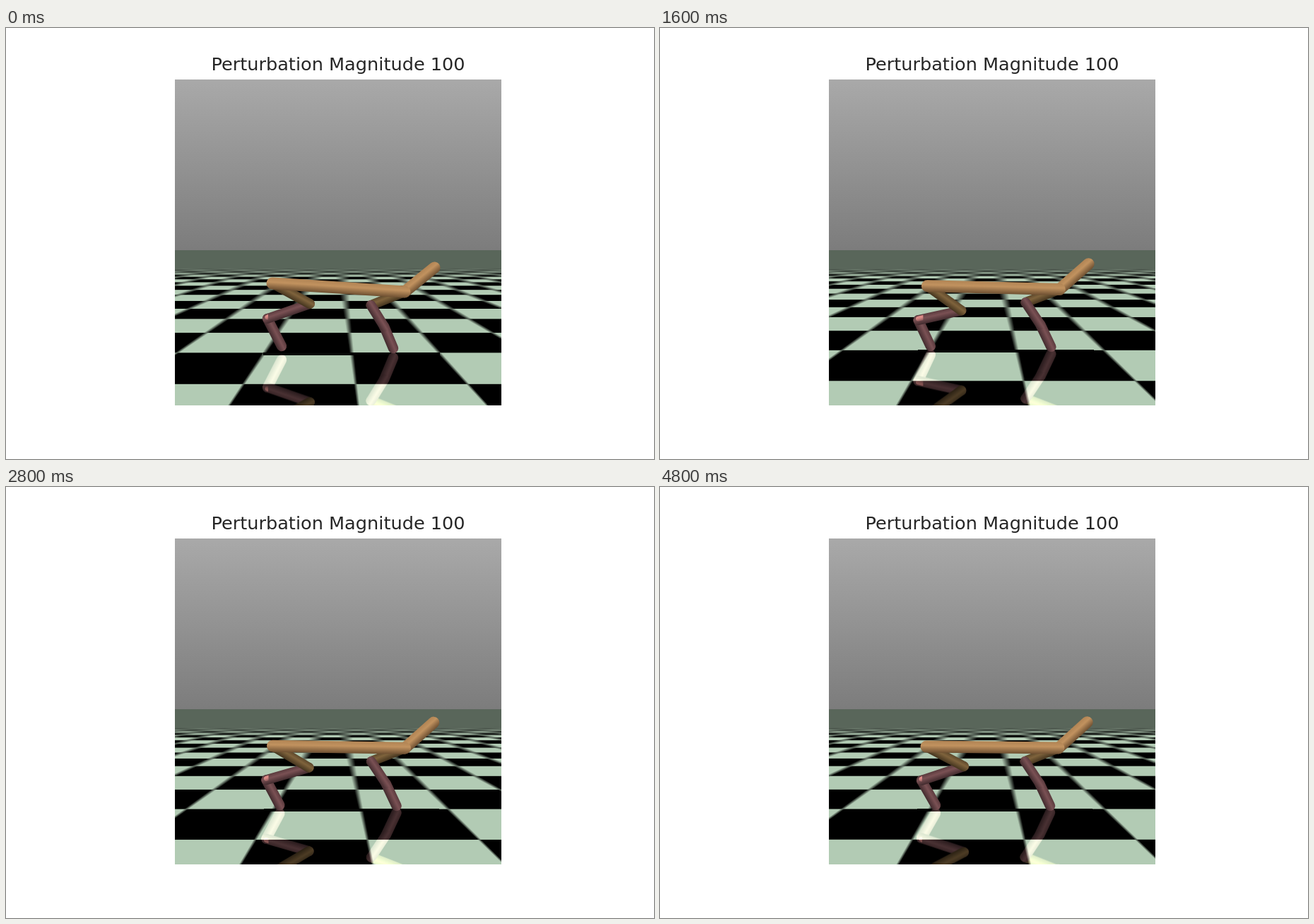
Write an HTML page with a canvas that moves like this. It is 917 px wide and 611 px high and loops after 5 s.

```html
<!DOCTYPE html>
<html>
<head>
<meta charset="utf-8">
<style>
  html, body { margin: 0; width: 100%; height: 100%; overflow: hidden; background: #fff; }
  canvas, svg { position: absolute; left: 0; top: 0; }
  text { font: 25.6px "DejaVu Sans", sans-serif; fill: #262626; text-anchor: middle; }
</style>
</head>
<body>
<canvas id="stage" width="917" height="611"></canvas>
<svg width="917" height="611"><text x="470" y="60">Perturbation Magnitude 100</text></svg>
<script>
const ctx = stage.getContext('2d');
const layer = document.createElement('canvas');
layer.width = 917;
layer.height = 611;
const pen = layer.getContext('2d');

const L = 239, T = 73, W = 462, H = 462, FLOOR = 315;
const CX = 470.3, CY = 304, FOCAL = 558.5;
const ROW = 3.52, BODY = 4.51;   // depths in tiles: a tile edge, the runner
const floor = ctx.createImageData(W, T + H - FLOOR);

const HIDE = ['#b18454', '#c1925f', '#6e5032'];
const THIGH = ['#5c472b', '#7f633c', '#45351f'];
const SHIN = ['#5a3a3d', '#7a5154', '#422b2e'];
const GLOW = ['#e08a86', '#d98a86', '#8d5a5b'];

const clamp = v => Math.min(1, Math.max(0, v));
const bump = (t, at) => Math.exp(-(((t - at) / .3) ** 2));

// The runner stands at rest, except for the first drop and the pushes (t in s)
function poseAt(t) {
  const drop = Math.exp(-t / .3);
  const kick = .45 * bump(t, 1.6) + bump(t, 3.2);
  const slip = clamp((t - 2.4) / .8);
  const rump = [377 + 3 * kick, 368 - 5 * kick - 6 * drop];
  const chest = [564 + 3 * kick, 370 + kick + 4 * drop];
  const tilt = Math.atan2(chest[1] - rump[1], chest[0] - rump[0]) - .745;
  return {
    shift: .19 + .055 * t - .036 * drop - .17 * slip,
    near: 195.8 + 5 * drop + kick,
    rump, chest,
    head: [chest[0] + 54.5 * Math.cos(tilt), chest[1] + 54.5 * Math.sin(tilt)],
    knee: [430 - 8 * kick, 396 + 10 * kick - 5 * drop],
    ankle: [370 - 10 * kick, 416 - 4 * kick - 4 * drop],
    toe: [390 - 16 * kick, 451],
    elbow: [516.5 + 2 * kick, 389 + 4 * drop],
    paw: [552 + 3 * kick - 4 * drop, 452 + 2 * drop]
  };
}

// Square wave of period 2 averaged over a window w
const ramp = u => { const m = ((u % 2) + 2) % 2; return m < 1 ? m : 2 - m; };
const wave = (u, w) => (ramp(u + w / 2) - ramp(u - w / 2)) / w;

function drawFloor({ shift, near, rump, head }) {
  const step = 1 / (near * ROW), d = floor.data;
  let o = 0;
  for (let y = 0; y < floor.height; y++) {
    const dy = FLOOR + y + .5 - CY;
    const z = 1 / (dy * step), span = z / dy;
    const v = wave(z - ROW, span) * clamp((dy - 36) / 14);
    const shade = z > BODY - .09 && z < BODY + .03;
    for (let x = 0; x < W; x++) {
      const px = L + x + .5;
      const u = (px - CX) / (dy * step * FOCAL) - shift;
      let c = .5 - .5 * v * wave(u, span * 1.8);
      if (shade && px > rump[0] - 13 && px < head[0] + 8) c *= .04;
      d[o++] = 178 * c;
      d[o++] = 203 * c;
      d[o++] = 180 * c;
      d[o++] = 255;
    }
  }
  ctx.putImageData(floor, L, FLOOR);
}

// Rounded limb shaded across its width, lit from above
function limb([ax, ay], [bx, by], width, tones) {
  const len = Math.hypot(bx - ax, by - ay);
  let nx = (by - ay) / len, ny = (ax - bx) / len;
  if (ny > 0) { nx = -nx; ny = -ny; }
  const r = width / 2;
  const g = pen.createLinearGradient(ax + nx * r, ay + ny * r, ax - nx * r, ay - ny * r);
  tones.forEach((c, i) => g.addColorStop([0, .4, 1][i], c));
  pen.strokeStyle = g;
  pen.lineWidth = width;
  pen.lineCap = 'round';
  pen.beginPath();
  pen.moveTo(ax, ay);
  pen.lineTo(bx, by);
  pen.stroke();
}

function drawRunner({ rump, chest, head, knee, ankle, toe, elbow, paw }) {
  const wrist = [(elbow[0] + paw[0]) / 2 + 3, (elbow[1] + paw[1]) / 2];
  pen.clearRect(0, 0, 917, 611);
  limb(ankle, toe, 14.5, SHIN);
  limb(knee, ankle, 14, SHIN);
  limb(rump, knee, 14, THIGH);
  limb(chest, elbow, 14, THIGH);
  limb(wrist, paw, 14.5, SHIN);
  limb(elbow, wrist, 14, SHIN);
  limb(chest, head, 16.5, HIDE);
  limb(rump, chest, 17, HIDE);
  // the hock catches light where it leaves the shadow of the trunk
  pen.save();
  pen.beginPath();
  pen.rect(0, 0, rump[0] - 6, 611);
  pen.clip();
  limb([knee[0], knee[1] - 3], [ankle[0], ankle[1] - 2], 7, GLOW);
  pen.restore();
}

function draw(t) {
  const pose = poseAt(t);
  ctx.clearRect(0, 0, 917, 611);
  const sky = ctx.createLinearGradient(0, T, 0, FLOOR);
  sky.addColorStop(0, '#a9a9a9');
  sky.addColorStop(1, '#7c7c7c');
  ctx.fillStyle = sky;
  ctx.fillRect(L, T, W, FLOOR - T);
  drawFloor(pose);

  drawRunner(pose);
  const ground = CY + pose.near * ROW / BODY;
  ctx.save();
  ctx.beginPath();
  ctx.rect(L, ground, W, T + H - ground);
  ctx.clip();
  ctx.globalCompositeOperation = 'lighter';
  ctx.globalAlpha = .6;
  ctx.translate(0, 2 * ground);
  ctx.scale(1, -1);
  ctx.drawImage(layer, 0, 0);
  ctx.restore();
  ctx.drawImage(layer, 0, 0);
}

let last = -1;
function tick() {
  const t = Math.floor(performance.now() % 5000 / 200) / 5;
  if (t !== last) draw(last = t);
  requestAnimationFrame(tick);
}
tick();
</script>
</body>
</html>
```
